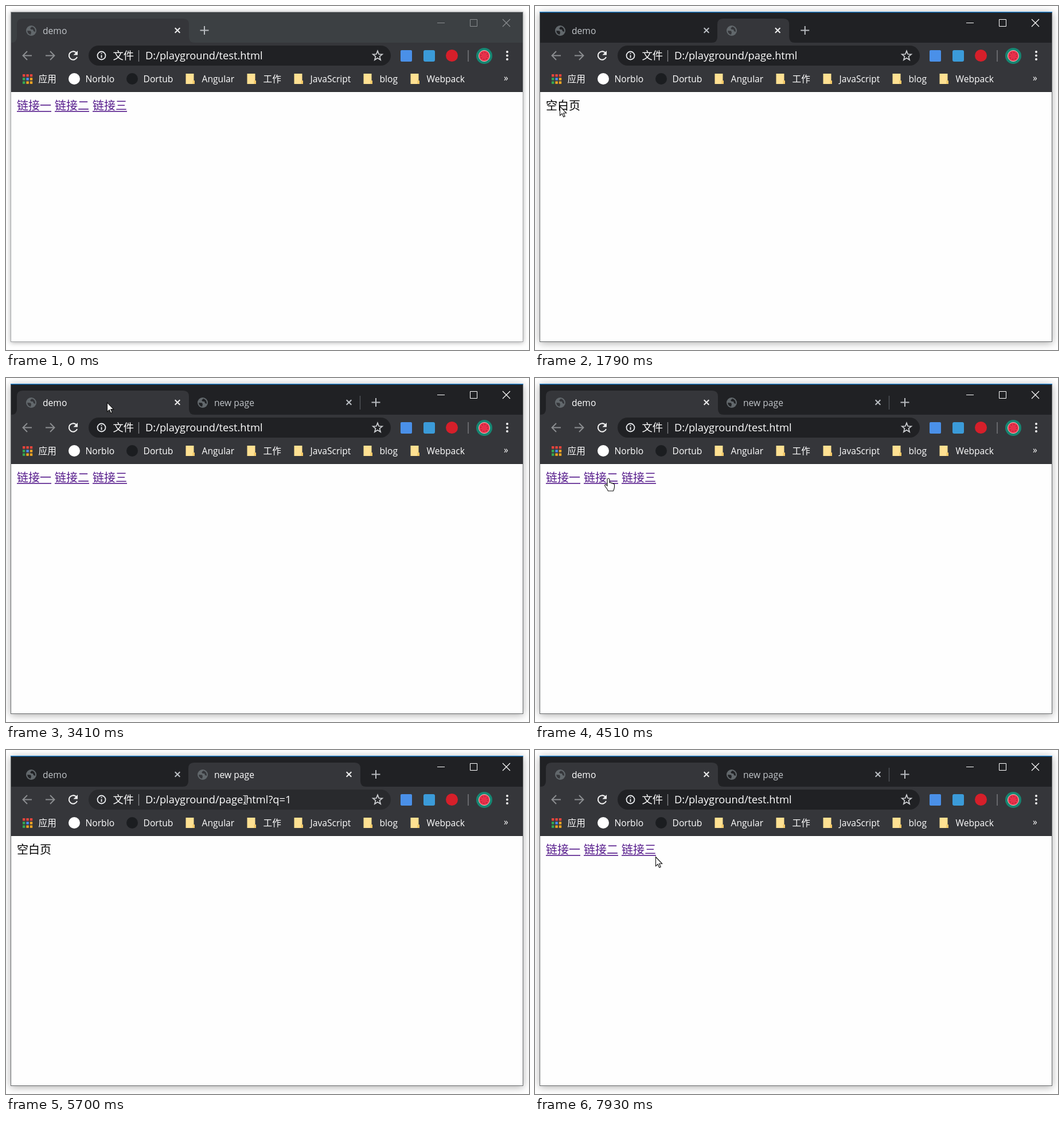
Write an HTML page that moves like this. It is 912x600 px and loops after 8 s.

```html
<!DOCTYPE html>
<html lang="zh-CN">
<head>
<meta charset="utf-8">
<title>demo</title>
<style>
html, body { margin: 0; height: 100%; overflow: hidden; background: #fff; }
svg { display: block; width: 912px; height: 600px; }
text { font: 15.65px "Open Sans", "Noto Sans CJK SC", "Noto Sans CJK", sans-serif; white-space: pre; }
.url { font-size: 18.3px; }
.page { font-size: 20px; font-weight: 350; }
.line { fill: none; }
</style>
</head>
<body>
<svg viewBox="0 0 912 600">
  <radialGradient id="glow" gradientUnits="userSpaceOnUse" r="110">
    <stop stop-color="#303135"/><stop offset="1" stop-color="#27282b"/>
  </radialGradient>
  <g id="frame"></g>
  <g id="bar"></g>
  <g id="top"></g>
</svg>
<script>
const LOOP = 8000;
const $ = id => document.getElementById(id);
const clamp = v => Math.max(0, Math.min(1, v));
const within = (v, from, to) => v > from && v < to;

const rect = (x, y, w, h, fill, more = '') =>
  `<rect x="${x}" y="${y}" width="${w}" height="${h}" fill="${fill}" ${more}/>`;
const disc = (x, y, r, fill, more = '') =>
  `<circle cx="${x}" cy="${y}" r="${r}" fill="${fill}" ${more}/>`;
const path = (d, color, width = 2) =>
  `<path class="line" d="${d}" stroke="${color}" stroke-width="${width}"/>`;
const text = (x, y, s, fill = '#fff', cls = '') =>
  `<text x="${x}" y="${y}" fill="${fill}" class="${cls}">${s}</text>`;
const cross = (x, y, r, color, w) =>
  path(`M${x - r} ${y - r}l${2 * r} ${2 * r}m0 ${-2 * r}l${-2 * r} ${2 * r}`, color, w);

// bookmarks flow from the left, each as wide as its label plus icon and padding
const pen = document.createElement('canvas').getContext('2d');
pen.font = getComputedStyle($('bar').appendChild(
  document.createElementNS('http://www.w3.org/2000/svg', 'text'))).font;
let edge = 19;
const bookmarks = ['应用', 'Norblo', 'Dortub', 'Angular', '工作', 'JavaScript', 'blog', 'Webpack'].map(label => {
  const left = edge;
  edge += Math.round(pen.measureText(label).width + 50.5);
  return { label, left, right: edge - 4 };
});
const links = ['一', '二', '三'].map((n, i) => ({ x: 19 + 66 * i, label: '链接' + n }));

// pointer moves: start, end, x, y
const home = [743, 532];
const moves = [
  [100, 410, 218, 257], [570, 1040, 28, 200], [1040, 1180, 43, 174.5],
  [2200, 2640, 192, 108], [2640, 2940, 179, 75], [3020, 3170, 176, 42],
  [3400, 3880, 165, 205], [4220, 4510, 128, 174.5], [5120, 5520, 417, 87],
  [5700, 5880, 480, 88], [5880, 6100, 376, 91], [6100, 6300, 432, 90],
  [6540, 7000, 225, 38],
  [7550, 7740, 262, 130], [7740, 7850, 166, 204], [7850, 7930, 210, 186]
];
function pointer(t) {
  let [x, y] = home;
  for (const [from, to, x1, y1] of moves) {
    const p = clamp((t - from) / (to - from)), ease = p * p * (3 - 2 * p);
    x += (x1 - x) * ease;
    y += (y1 - y) * ease;
  }
  return [x, y];
}

const shapes = {
  arrow: 'M.5 .5V16.5L4.2 13.2L6.8 19L9.2 18L6.7 12.3H11.7Z',
  hand: 'M-2 2Q0-1 2 2V8Q4 7 5 9Q7 8 8 10Q10.5 9.5 10.5 12V16Q10.2 19 8.5 22.5H-.5' +
        'Q-2 19-5 15.5Q-7.5 12-5.5 11.5Q-4 11-2 13.5Z'
};
function cursor(kind, x, y) {
  const at = `transform="translate(${x.toFixed(1)} ${y.toFixed(1)})"`;
  if (kind == 'beam')
    return `<g ${at}>${path('M-3.5-7.5H-1L0-6.5L1-7.5H3.5M0-6.5V6.5M-3.5 7.5H-1L0 6.5L1 7.5H3.5', '#ddd', 1.2)}</g>`;
  return `<path ${at} d="${shapes[kind]}" fill="#fff" stroke="#111" stroke-width="1.1"/>`;
}

const globe = (x, back) => disc(x, 43, 9, '#62686c') +
  `<path transform="translate(${x} 43)" fill="${back}" d="M-6.8 0L-1 .5L0 3L-1 7Q-6.5 5.5-6.8 0ZM1-7L-2-4L0-2H3L4 1L7 2Q7.5-5 1-7Z"/>`;
const tabPath = (x, w) =>
  `M${x - 10} 64Q${x} 64 ${x} 54V32Q${x} 22 ${x + 10} 22H${x + w - 10}` +
  `Q${x + w} 22 ${x + w} 32V54Q${x + w} 64 ${x + w + 10} 64Z`;

function tab(x, w, title, front, focused, fill) {
  const ink = front && focused ? '#fff' : '#c1c5c9';
  let out = fill ? `<path d="${tabPath(x, w)}" fill="${fill}"/>` : '';
  if (w > 60) out += globe(x + 25, front ? '#35363a' : '#202124') +
    cross(x + w - 20, 42.5, 4.3, front ? '#f1f1f1' : '#bdc1c6', 2);
  return w > 150 ? out + text(x + 45, 49, title, ink) : out;
}

function drawFrame({ focused, onNew, grow, x, y }) {
  const ink = focused ? '#fff' : '#8b8e91';
  const shadow = focused ? '0 2px 7px #0005' : '0 1px 4px #0005';
  const width = 300 * grow, plus = 346 + 299 * grow;
  const demoHover = onNew && y < 76 && within(x, 19, 319);
  let out = rect(8, 10, 894, 576, '#fefefe', `style="filter:drop-shadow(${shadow})"`) +
    rect(8, 10, 894, 54, focused ? '#202124' : '#3c4043');
  if (onNew) {
    out += tab(19, 300, 'demo', false, true, demoHover && 'url(#glow)') +
      tab(318, Math.max(24, width), 'new page', true, true, '#35363a');
  } else {
    if (grow) out += tab(318, width, 'new page', false, true) + path('M617.5 31V55', '#55585c', 1.3);
    out += tab(19, 300, 'demo', true, focused, '#35363a');
  }
  out += path(`M${plus - 7.5} 42.5h15m-7.5-7.5v15`, '#b8bbbf', 2) +
    path('M752 29.5h13M809.5 23.5h12v12h-12z', ink, 1) + cross(872.5, 29.5, 6.5, ink, 1.2) +
    rect(8, 64, 894, 86, '#35363a') + rect(8, 149, 894, 1, '#28292c');
  const inBox = within(y, 69, 104) && within(x, 144, 671);
  out += rect(144, 69, 527, 35, inBox ? '#292a2d' : '#202124', 'rx="17.5"');
  for (const { left, right } of bookmarks)
    if (within(x, left, right) && within(y, 107, 145))
      out += rect(left, 108, right - left, 37, '#3d3e42', 'rx="18"');
  return out;
}

function drawBar() {
  const star = Array.from({ length: 10 }, (_, i) => {
    const r = i % 2 ? 3.7 : 8.6, a = i * Math.PI / 5;
    return [648 + r * Math.sin(a), 87 - r * Math.cos(a)].map(v => v.toFixed(1));
  });
  let out = path('M45 86.5H30M37 79L29.5 86.5L37 94M69 86.5H84M77 79L84.5 86.5L77 94', '#8c8e91', 1.9) +
    path('M122.5 81.5A7.3 7.3 0 1 0 124 89', '#f1f1f1', 2.1) +
    '<path d="M125 78V85.5H117.5Z" fill="#f1f1f1"/>' +
    disc(166.5, 86.5, 7, 'none', 'stroke="#e8eaed" stroke-width="1.8"') +
    path('M166.5 85.5V90.5M166.5 82V83.8', '#e8eaed', 1.9) +
    text(186.5, 93, '文件', '#fff', 'url') + path('M231.5 77V97', '#85878a', 1.3) +
    path(`M${star.join('L')}Z`, '#d0d2d5', 1.7) +
    rect(688, 77, 20, 20, '#4a90e8', 'rx="2"') +
    rect(728, 77, 20, 20, '#3b9bd9', 'rx="3"') +
    disc(777.5, 86.5, 10.5, '#d61f2a') + path('M806 77V97', '#77797c', 1.5) +
    disc(834, 87, 14, '#168672') + disc(834, 87, 9.5, '#e8304a', 'stroke="#f6c9c4"') +
    disc(834, 87, 6, 'none', 'stroke="#6b2030" stroke-width="1.2" stroke-dasharray="1.2 3.5"');
  for (let i = 0; i < 3; i++) out += disc(874, 80 + 6.5 * i, 2, '#f1f1f1');
  const [red, green, blue, gold] = ['#e8453c', '#34a853', '#4c8bf5', '#f6a623'];
  [red, red, red, green, blue, gold, green, gold, gold].forEach((c, i) =>
    out += rect(29 + i % 3 * 6.4, 119 + (i / 3 | 0) * 6.2, 4.4, 4.4, c));
  bookmarks.forEach(({ label, left }, i) => {
    const icon = left + 9.5;
    if (i == 1 || i == 2) out += disc(left + 18, 127, 10, i == 1 ? '#fff' : '#1b1d20');
    if (i > 2) out += rect(icon, 118, 14, 18, '#ffe192') + rect(icon + 12, 130, 3.5, 6, '#f3c867');
    out += text(left + 37.5, 133, label);
  });
  return out + text(868, 131, '»');
}

function drawTop({ focused, onNew, query, status, x, y, visible }) {
  const file = 'page.html' + (query ? '?q=1' : '');
  let out = text(243, 93, 'D:/playground/' + (onNew ? file : 'test.html'), '#fff', 'url');
  if (onNew) out += text(19, 181, '空白页', '#000', 'page');
  else for (const link of links)
    out += text(link.x, 181, link.label, '#551a8b', 'page') + rect(link.x, 183, 60, 1.6, '#551a8b');
  if (status) {
    const right = query ? 285 : 248;
    out += `<g opacity="${status}"><path d="M8 557H${right}q4 0 4 4V585H8Z" fill="#35363a"/>` +
      text(15, 577, 'file:///D:/playground/' + file, '#b4b7ba') + '</g>';
  }
  out += rect(8.5, 10.5, 893, 575, 'none', `stroke="${focused ? '#66696b' : '#a2a4a6'}"`);
  if (focused) out += rect(8, 10, 894, 1.3, '#1883d7');
  if (visible) {
    const onLink = !onNew && within(y, 162, 186) && links.some(l => within(x, l.x, l.x + 60));
    const onUrl = within(y, 69, 104) && within(x, 236, 632);
    out += cursor(onLink ? 'hand' : onUrl ? 'beam' : 'arrow', x, y);
  }
  return out;
}

const shown = {};
function put(id, html) {
  if (shown[id] !== html) $(id).innerHTML = shown[id] = html;
}

function draw(t) {
  const [x, y] = pointer(t);
  const onNew = within(t, 1720, 3340) || within(t, 5050, 7150);
  const fade = from => clamp((t - from) / 120);
  const state = {
    x, y, onNew,
    visible: t >= 100,
    focused: t >= 1640,
    grow: 1 - (1 - clamp((t - 1720) / 300)) ** 2,
    query: t >= 4200,
    status: t < 1720 ? fade(1290) : t < 5050 ? fade(4790) : 0
  };
  $('glow').setAttribute('cx', x);
  $('glow').setAttribute('cy', y);
  put('frame', drawFrame(state));
  put('top', drawTop(state));
}

put('bar', drawBar());
const start = performance.now();
(function tick() {
  draw((performance.now() - start) % LOOP);
  requestAnimationFrame(tick);
})();
</script>
</body>
</html>
```
